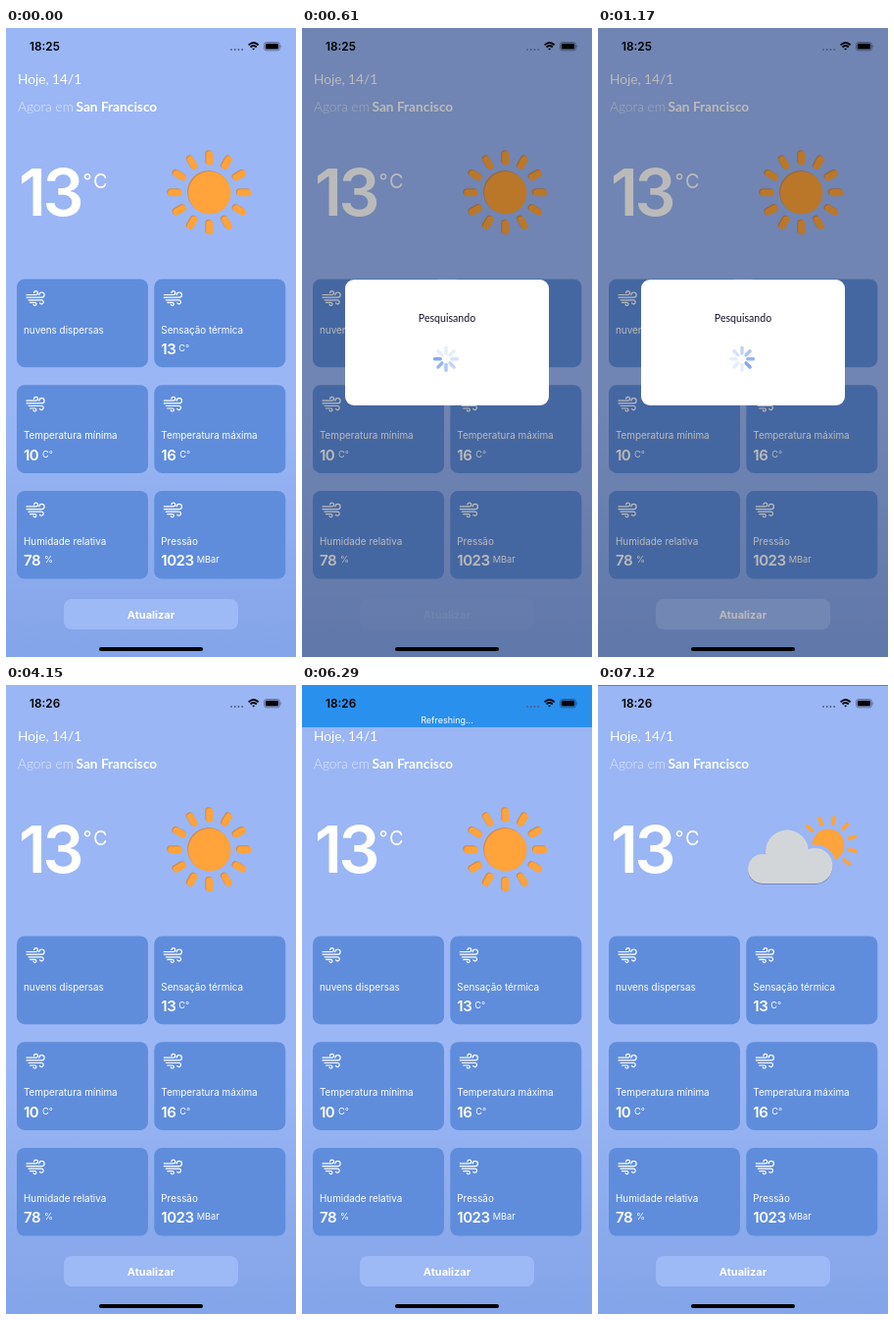
Recreate the animation shown at these times as an HTML page. Size 296 px wide and 640 px high, loop 8000 ms.

```html
<!DOCTYPE html>
<html lang="pt">
<head>
<meta charset="utf-8">
<title>Clima</title>
<style>
html, body { margin: 0; width: 100%; height: 100%; overflow: hidden; background: #9ab6f5; }
svg { display: block; width: 100%; height: 100%; }
text { font-family: Inter, sans-serif; fill: #fff; white-space: pre; }
.lato { font-family: Lato, sans-serif; font-size: 13.7px; }
.mid { text-anchor: middle; }
.label { font-size: 9.9px; }
.value { font-size: 15px; font-weight: 600; letter-spacing: -.5px; }
.unit { font-size: 9.2px; }
.line { fill: none; stroke-linecap: round; stroke-linejoin: round; }
</style>
</head>
<body>
<svg viewBox="0 0 296 640">
  <defs>
    <linearGradient id="sky" x2="0" y2="1">
      <stop offset=".6" stop-color="#9ab6f5"/>
      <stop offset="1" stop-color="#83a4e8"/>
    </linearGradient>
    <g id="wind" class="line" stroke="#fff" stroke-width="1.2">
      <path d="M10 17h9.500a1.900 1.900 0 1 0-1.900-1.900M10 19.700h15.500a2.600 2.600 0 1 0-2.600-2.600M12 22.300h13a2 2 0 1 1-1.500 3M13.500 24.800h5a1.500 1.500 0 1 1-1.500 1.800"/>
    </g>
    <g id="cloudShape">
      <circle cx="168" cy="187" r="15"/>
      <circle cx="193" cy="169.500" r="22"/>
      <circle cx="221.500" cy="184" r="18"/>
      <rect x="168" y="178" width="54" height="24"/>
    </g>
    <g id="sunShape">
      <circle cx="207.500" cy="167.500" r="21.700" stroke="none"/>
      <g id="rays" stroke-width="7" stroke-linecap="round"/>
    </g>
  </defs>

  <rect width="296" height="640" fill="url(#sky)"/>
  <text class="lato" x="12" y="57">Hoje, 14/1</text>
  <text class="lato" x="12" y="85" font-weight="300" opacity=".7">Agora em</text>
  <text class="lato" x="71.500" y="85" font-weight="700">San Francisco</text>
  <text x="13 37.500" y="191" font-size="66" font-weight="600">13</text>
  <text x="78.500 89" y="163" font-size="20">°C</text>

  <g id="sun">
    <use href="#sunShape" x="-.7" y="-.7" fill="#d18b4c" stroke="#d18b4c"/>
    <use href="#sunShape" x=".3" y=".3" fill="#ffa33a" stroke="#ffa33a"/>
  </g>
  <g id="cloud">
    <circle cx="235" cy="163" r="16.500" fill="#ffa33a"/>
    <g id="cloudRays" stroke="#ffa33a" stroke-width="4" stroke-linecap="round"/>
    <use href="#cloudShape" fill="#9ab6f5" stroke="#9ab6f5" stroke-width="7"/>
    <use href="#cloudShape" y=".9" fill="#7288b8"/>
    <use href="#cloudShape" fill="#d3d6d9"/>
  </g>

  <g id="cards"/>
  <g id="button">
    <rect x="59" y="581" width="178" height="31" rx="8" fill="#9db9f6"/>
    <text class="mid" x="148" y="600.500" font-size="11" font-weight="700">Atualizar</text>
  </g>
  <rect x="95" y="630" width="106" height="4" rx="2"/>

  <g id="modal">
    <rect width="296" height="640" fill="#000" opacity=".27"/>
    <rect x="44" y="256" width="208" height="128" rx="9" fill="#fff"/>
    <text class="lato mid" x="148" y="299" style="font-size:10.600px;fill:#14142b">Pesquisando</text>
    <g id="spinner" stroke="#86a8f0" stroke-width="3.500" stroke-linecap="round"/>
  </g>

  <g id="banner">
    <rect width="296" height="43" fill="#2a90ee"/>
    <text class="mid" x="148" y="39" font-size="9">Refreshing...</text>
  </g>

  <text id="clock" x="24" y="23" font-size="11.800" font-weight="600" style="fill:#000"></text>
  <path class="line" d="M230 22h14" stroke="#4c5b80" stroke-width="1.800" stroke-dasharray="0 3.700"/>
  <g class="line" stroke="#000" stroke-width="1.900" stroke-linecap="butt">
    <path d="M247.600 17.400q5-4.600 10 0M249.500 19.500q3.100-2.900 6.200 0" style="stroke-linecap:butt"/>
    <path d="M251 20.700h3.200l-1.600 1.700z" fill="#000" stroke="none"/>
  </g>
  <rect x="263.500" y="14.500" width="16" height="8.400" rx="2.500" fill="none" stroke="#000" stroke-opacity=".45" stroke-width=".8"/>
  <rect x="264.800" y="15.800" width="13.400" height="5.800" rx="1.400"/>
  <path d="M280.700 17.200q1.400 1.500 0 3z" opacity=".5"/>
</svg>

<script>
const LOOP = 8000;
const $ = id => document.getElementById(id);
const clamp = (v, a = 0, b = 1) => Math.min(b, Math.max(a, v));
const smooth = p => p * p * (3 - 2 * p);
const show = (id, on) => $(id).style.display = on ? '' : 'none';

// Spokes pointing outwards from (x, y), evenly spaced from angle `start`
const spokes = (x, y, inner, outer, count, start, step) =>
  Array.from({ length: count }, (_, i) =>
    `<path d="M${inner} 0H${outer}" transform="translate(${x} ${y}) rotate(${start + i * step})"/>`).join('');

$('rays').innerHTML = spokes(207.5, 167.5, 31.5, 39, 12, 0, 30);
$('cloudRays').innerHTML = spokes(235, 163, 22.5, 28.5, 7, -138, 30);
$('spinner').innerHTML = spokes(147, 336.8, 5.8, 11.5, 8, 0, 45);

const cards = [
  ['nuvens dispersas'], ['Sensação térmica', '13', 'C°', 18],
  ['Temperatura mínima', '10', 'C°', 19], ['Temperatura máxima', '16', 'C°', 19],
  ['Humidade relativa', '78', '%', 21], ['Pressão', '1023', 'MBar', 36.5],
];
$('cards').innerHTML = cards.map(([label, value = '', unit = '', gap = 0], i) => `
  <g transform="translate(${11 + i % 2 * 140.3} ${255.5 + (i >> 1) * 107.7})">
    <rect width="134" height="89.700" rx="8" fill="#5f8ddc"/>
    <use href="#wind" y="-1"/>
    <text class="label" x="7" y="55">${label}</text>
    <text class="value" x="7" y="76.500">${value}</text>
    <text class="unit" x="${7 + gap}" y="73.500">${unit}</text>
  </g>`).join('');

function draw(t) {
  $('clock').textContent = t < 4150 ? '18:25' : '18:26';
  show('modal', t >= 610 && t < 4150);

  // Button dims on press, then recovers
  $('button').style.opacity = t < 500 ? 1 : 0.15 + 0.85 * smooth(clamp((t - 640) / 250));

  // Spinner head starts at the left and stops at the right
  const head = 4 + Math.round(clamp((t - 610) / 107.5, 0, 12));
  [...$('spinner').children].forEach((spoke, i) => {
    const age = (head - i + 16) % 8;
    spoke.style.opacity = Math.max(0.2, 1 - age * 0.17);
  });

  show('banner', t >= 6290);
  $('banner').setAttribute('transform', `translate(0 ${-42 * smooth(clamp((t - 6840) / 280))})`);
  show('sun', t < 6890);
  show('cloud', t >= 6890);
}

const begin = performance.now();
function tick() {
  draw((performance.now() - begin) % LOOP);
  requestAnimationFrame(tick);
}
tick();
</script>
</body>
</html>
```
